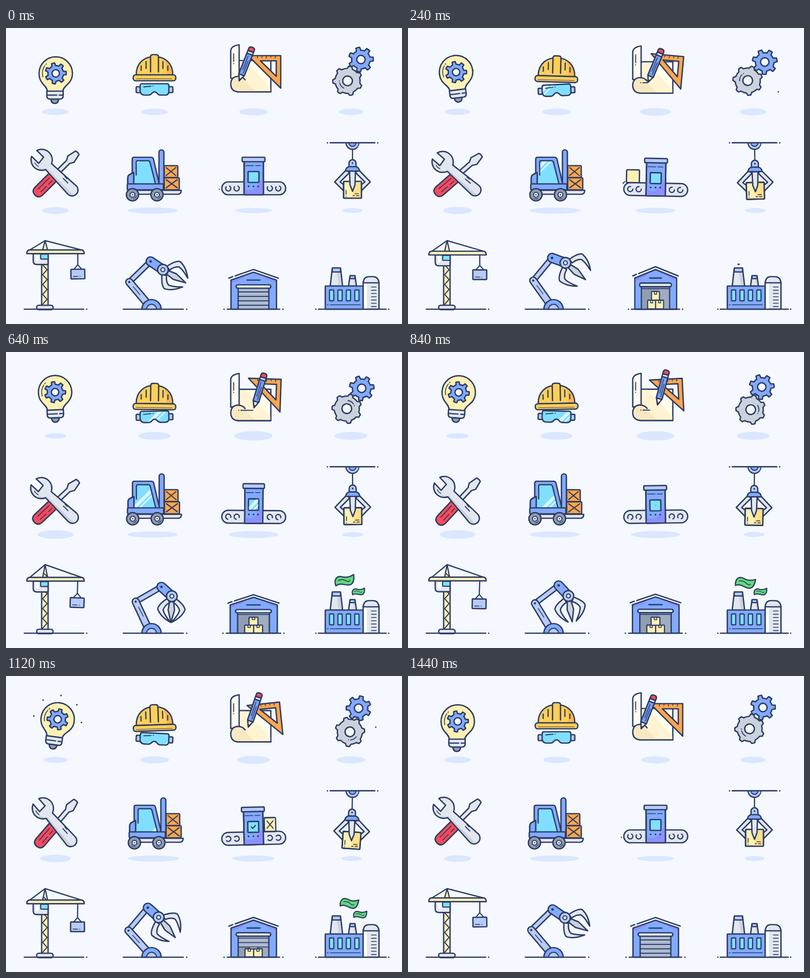
Write an HTML page with a canvas that moves like this. It is 800 by 600 pixels and loops after 1480 ms.

```html
<!DOCTYPE html>
<html lang="en">
<head>
<meta charset="utf-8">
<title>Industry icons</title>
<style>
  html, body { margin: 0; width: 100%; height: 100%; overflow: hidden; background: #f5f8ff; }
  canvas { display: block; width: 800px; height: 600px; }
</style>
</head>
<body>
<canvas id="stage"></canvas>
<script>
const LOOP = 1480, STEP = 40, CYCLE = 1440;
const INK = '#2b3b63', BG = '#f5f8ff', SHADOW = '#dbe6ff', BLUE = '#82aaff', PALE = '#b7cbf8',
  VIOLET = '#8c90ff', CYAN = '#80dfff', CREAM = '#fff0b3', GOLD = '#ffcf58', ORANGE = '#ffa64d',
  RED = '#fa4a5b', LIGHT = '#e2e7ef', GREY = '#cbd2dc', SLATE = '#909db3', GREEN = '#62d97c';
const cv = document.getElementById('stage'), g = cv.getContext('2d');
const dpr = window.devicePixelRatio || 1;
cv.width = 800 * dpr;
cv.height = 600 * dpr;

let t = 0, sin = 0, lift = 0;

// Drawing helpers
function shape(d, fill, w = 2.7) {
  const p = typeof d === 'string' ? new Path2D(d) : d;
  if (fill) { g.fillStyle = fill; g.fill(p, 'evenodd'); }
  if (w) { g.lineWidth = w; g.stroke(p); }
}
function line(d, w = 2) { shape(d, null, w); }
function rect(x, y, w, h, r, fill, lw) {
  const p = new Path2D();
  p.roundRect(x, y, w, h, r);
  shape(p, fill, lw);
}
function oval(x, y, rx, ry, fill, lw) {
  const p = new Path2D();
  p.ellipse(x, y, rx, ry, 0, 0, 2 * Math.PI);
  shape(p, fill, lw);
}
const disc = (x, y, r, fill, lw) => oval(x, y, r, r, fill, lw);
const dot = (x, y, r = 1.5) => disc(x, y, r, INK, 0);
const shadow = (x, rx, y, ry) => oval(x, y, rx, ry, SHADOW, 0);
function arc(x, y, r, a, b, w = 2) {
  const p = new Path2D();
  p.arc(x, y, r, a * Math.PI / 180, b * Math.PI / 180);
  shape(p, null, w);
}
function put(x, y, deg, fn, sx = 1, sy = sx) {
  g.save();
  g.translate(x, y);
  g.rotate(deg * Math.PI / 180);
  g.scale(sx, sy);
  fn();
  g.restore();
}
function turn(x, y, deg, fn, sx, sy) {
  put(x, y, deg, () => { g.translate(-x, -y); fn(); }, sx, sy);
}
function clip(d, fn) {
  g.save();
  g.clip(new Path2D(d));
  fn();
  g.restore();
}
function shine(d, x, y) {
  clip(d, () => {
    shape(`M${x - 35},${y + 30}l60,-60h9l-60,60z m14,0l60,-60h4l-60,60z`, 'rgba(255,255,255,.72)', 0);
  });
}
function ground(a, b, dots) {
  line(`M${a},570H${b}`, 2.6);
  dots.forEach(x => dot(x, 570));
}

// Timing helpers
const KEYS = [0, 240, 440, 640, 1000, 1240], N = KEYS.length;
function pose(...v) {
  const u = t % CYCLE;
  let i = N - 1;
  while (KEYS[i] > u) i--;
  const at = j => KEYS[(j + N) % N] + CYCLE * Math.floor(j / N);
  const val = j => v[(j + N) % N];
  const slope = j => (val(j + 1) - val(j - 1)) / (at(j + 1) - at(j - 1));
  const d = at(i + 1) - at(i), x = (u - at(i)) / d, y = 1 - x;
  return y * y * (1 + 2 * x) * val(i) + x * x * (3 - 2 * x) * val(i + 1)
    + d * x * y * (y * slope(i) - x * slope(i + 1));
}
function ramp(a, b) {
  const x = Math.min(1, Math.max(0, (t - a) / (b - a)));
  return x * x * (3 - 2 * x);
}
function lerpKeys(...k) {
  if (t <= k[0]) return k[1];
  for (let i = 2; i < k.length; i += 2)
    if (t <= k[i]) return k[i - 1] + (k[i + 1] - k[i - 1]) * (t - k[i - 2]) / (k[i] - k[i - 2]);
  return k[k.length - 1];
}

function gear(x, y, r, root, deg, fill, hole, base, tip) {
  put(x, y, deg, () => {
    const p = new Path2D(), s = 2 * Math.PI / 7;
    for (let i = 0; i < 7; i++) {
      p.arc(0, 0, r, (i - tip) * s, (i + tip) * s);
      p.arc(0, 0, root, (i + base) * s, (i + 1 - base) * s);
    }
    p.closePath();
    shape(p, fill);
    disc(0, 0, hole, BG);
  });
}

function bulb() {
  shadow(100, 27 - 5.3 * lift, 170, 6.5 - lift);
  turn(100.5, 120 - 11 * lift, -8 * sin, () => {
    g.translate(100.5, 92 - 11 * lift);
    const u = t % 720, grow = 34 + 20 * Math.sqrt(Math.min(1, Math.max(0, u - 240) / 300));
    const size = u > 460 ? Math.max(0, 1 - (u - 440) / 70) : 1;
    if (u >= 240) for (let a = 0; a < 5; a++)
      dot(-grow * Math.cos(a * Math.PI / 4), -grow * Math.sin(a * Math.PI / 4), 1.6 * size);
    shape('M-17,37C-17,24 -33.7,22 -33.7,0A33.7,33.7 0 0 1 33.7,0C33.7,22 15,24 14,37Z', CREAM);
    shape('M-10,52H6Q5,61 -2,61Q-9,61 -10,52Z', SLATE);
    shape('M-18,36H15V45Q15,52 9,52H-12Q-18,52 -18,45Z', LIGHT);
    line('M-18,44H2M7,44H15', 2.4);
    arc(0, 0, 27, 165, 215, 1.6);
    arc(0, 0, 27, 222, 226, 1.6);
    gear(0, 0, 21.3, 15.8, t / 4 - 2, BLUE, 7.5, .27, .17);
  });
}

function helmet() {
  shadow(300, 27 + 6 * lift, 170, 6.5 + 1.5 * lift);
  put(300, 92 + 10 * lift, 2 * sin, () => {
    const dome = 'M-37,3C-37,-22 -20,-34 0,-34C20,-34 37,-22 37,3Z';
    shape(dome, GOLD, 0);
    clip(dome, () => shape('M14,-40H40V4H24Q26,-20 14,-40Z', '#ffb64f', 0));
    shape(dome);
    shape('M-8,-3V-34Q-8,-38 -3,-38H3Q8,-38 8,-34V-3', GOLD);
    line('M-17,-24V-10M-27,-15V-6M17,-24V-10M27,-15V-6', 2.4);
    rect(-43, 3, 86, 12, 5, GOLD);
    line('M-37,11H36', 1);
  });
  put(300, 124 + 7 * lift, -3 * sin, () => {
    rect(-37, -5, 10, 12, 2, PALE);
    rect(27, -5, 10, 12, 2, PALE);
    const lens = 'M-29,-7Q-29,-11 -25,-11H25Q29,-11 29,-7V4Q29,12 22,12H12Q8,12 5,8Q0,3 -5,8Q-8,12 -12,12H-20Q-28,12 -29,4Z';
    shape(lens, CYAN, 0);
    shine(lens, (t - 620) * .075, 0);
    shape(lens);
    line('M-22,-4.5L-7,-6M-3,-6.3h.5', 1.8);
  });
}

function blueprint() {
  shadow(500, 29 + 10 * lift, 170, 7 + 2.5 * lift);
  put(0, 10 * lift, 0, () => {
    shape('M468,66H535V129.5H468Z', '#fffdea');
    shape('M473,67.5H484L534,122V128.5H473Z', '#fff3d2', 0);
    shape('M471,34V102H454V46Q455,36 471,34Z', '#fffdf0');
    line('M460,52V68M460,72v.5', 1.8);
    shape('M454,113Q455,99 468,98Q481,99 484,110L505,129.5H470Q454,129 454,113Z', '#f8e8c2', 0);
    line('M535,129.5H470Q454,129 454,113Q455,99 468,98Q478,98 483,105', 2.7);
    const end = lerpKeys(60, 470, 240, 484, 440, 497, 680, 499, 1000, 478, 1100, 468);
    if (end > 470) line(`M470,108.5h.4M474.5,108.5H${Math.max(474.6, end)}`, 2);
  });
  turn(530, 78, 6 * sin, () => {
    g.translate(0, -1.5 * lift);
    shape('M489,56H555V122ZM514,66.5H546V98Z', ORANGE);
    line('M508,57v4M517,57v3M526,57v4M535,57v3M544,57v4', 1.6);
  });
  const x = pose(471, 485, 498, 501, 502, 475), y = pose(107, 110, 110.5, 113, 103, 105.5);
  put(x, y, pose(21.5, 22.4, 21, 17, 15, 23), () => {
    shape('M0,0L-6,-14H6Z', '#fff0d0');
    shape('M0,0L-2.4,-5.5H2.4Z', INK, 0);
    rect(-6, -59, 12, 46, 1, '#7a9ff5');
    line('M-1.5,-53V-24M2,-44V-18', 1.5);
    rect(-6, -64, 12, 6, 1, LIGHT);
    shape('M-6,-64V-68Q-6,-73 0,-73Q6,-73 6,-68V-64Z', RED);
  });
}

function gears() {
  shadow(697, 25 + 8.5 * lift, 170, 6.5 + 1.8 * lift);
  if (t >= 160 && t < 600) dot(lerpKeys(160, 752, 240, 748, 440, 724, 600, 700), lerpKeys(160, 130, 600, 126));
  if (t >= 880 && t < 1220) dot(lerpKeys(880, 703, 1000, 723, 1200, 763), lerpKeys(880, 93, 1000, 97, 1200, 108));
  const a = (-58 + 12 * sin) * Math.PI / 180, dx = 25.5 * Math.cos(a), dy = 25.5 * Math.sin(a);
  const y = 85.5 + 9 * lift, spin = t / 4;
  gear(703.5 + dx, y + dy, 25, 18.8, -spin - 2, BLUE, 8.5, .27, .17);
  gear(703.5 - dx, y - dy, 29.8, 25.4, spin + 178, GREY, 9.8, .24, .12);
  arc(703.5 - dx, y - dy, 16.5, spin + 118, spin + 165, 1.8);
  arc(703.5 - dx, y - dy, 16.5, spin + 178, spin + 180, 1.8);
}

function tools() {
  shadow(100, 27 + 9.5 * lift, 370, 6.8 + 2 * lift);
  const y = 297 + 8 * lift;
  put(103, y - 3, -45 + 4.5 * sin, () => {
    shape('M-10,-4.5H32L40,-9L58,-5Q60,0 58,5L40,9L32,4.5H-10Z', LIGHT);
    shape('M-12,-11H-53Q-63,-10 -63,0Q-63,10 -53,11H-12Q-8,0 -12,-11Z', RED);
    line('M-50,-4H-18M-50,4H-34M-28,4H-18', 1.8);
  });
  put(103, y + 1, 45 - 4.5 * sin, () => {
    g.translate(-44, 0);
    const body = 'M-20,-6.4H-.5L1,9.5H-19A21.5,21.5 0 0 0 20,8.5L87,12A12,12 0 0 0 87,-12L20,-8.5A21.5,21.5 0 0 0 -20,-6.4Z';
    shape(body, LIGHT, 0);
    clip(body, () => shape('M-14,14Q10,20 20,5H100V16H-14Z', GREY, 0));
    shape(body);
    line('M58,-4L71,-4M58,-9L64,-9', 2);
    arc(0, 0, 15, 70, 110, 1.6);
  });
}

function crate(x, y, w, h, deg) {
  put(x + w / 2, y + h / 2, deg, () => {
    const a = w / 2 - 4, b = h / 2 - 4;
    rect(-w / 2, -h / 2, w, h, 2, ORANGE);
    line(`M${-a},${-b}L${a},${b}M${a},${-b}L${-a},${b}`, 2.2);
  });
}

function forklift() {
  const s = 2 - 2 * Math.cos(t / CYCLE * 4 * Math.PI);
  shadow(296 + s / 2, 50.5 + s * .4, 370, 6.3);
  put(s, 0, 0, () => {
    const hop = pose(0, 0, 1, 0, 0, 0);
    crate(319.5 + hop, 303.5 - 1.5 * hop, 30.5, 24.5, -3 * hop);
    crate(319.5 + hop, 279 - 2.5 * hop, 27.5, 24, -3.5 * hop);
    shape('M246,328V304Q246,299 250,297L257,293V328Z', BLUE);
    shape('M255,318V266Q255,262 259,262H293Q297,262 298,266L310,318Z', BLUE);
    const pane = 'M263,270H288L301,316H259Z';
    shape(pane, CYAN, 0);
    shine(pane, 280 + (t - 620) * .075, 293);
    line('M263,298V272Q263,269 266,269H287Q290,269 291,272L302,316', 2.4);
    shape('M246,316V304Q246,299 250,297L258,293V316Z', BLUE, 0);
    line('M246,316V304Q246,299 250,297L258,293V316', 2.7);
    rect(309, 247, 10, 82, 5, BLUE);
    rect(245, 316, 73, 12, 2, BLUE);
    shape('M262,329H354Q354,337 347,337H262Z', LIGHT);
    for (const x of [255.5, 305]) {
      disc(x, 338, 12.3, SLATE);
      disc(x, 338, 5, LIGHT, 2.2);
      put(x, 338, s * 15, () => { dot(0, 0, 1.3); arc(0, 0, 8.4, 20, 75, 1.3); });
    }
  });
}

function parcel(x, y, cross) {
  const size = Math.min(ramp(40, 200), 1 - ramp(1200, 1400));
  if (size <= .02) return;
  put(x, y, 0, () => {
    rect(-13, -26, 26, 26, 2, CREAM);
    if (cross) line('M-7,-20L7,-6M7,-20L-7,-6', 2);
  }, size * (cross ? .88 : 1), size * (cross ? 1.08 : 1));
}

function conveyor() {
  shadow(500, 37.5 + 13 * lift, 370, 5.3 + 2 * lift);
  turn(500, 325 + 9.5 * lift, 1.3 * sin, () => {
    g.translate(0, 9.5 * lift);
    rect(436, 312, 129, 26, 13, LIGHT);
    for (const x of [449, 466, 533, 550]) arc(x, 325, 5.2, t / 4 - 60, t / 4 + 215, 2.5);
    if (t % CYCLE < 80) dot(431, 327, 1.2);
    if (t > 160 && t < 320) arc(440, 316, 6, 200, 250, 2);
    parcel(lerpKeys(40, 436, 240, 454, 440, 485, 540, 500, 895, 500, 1000, 516, 1240, 552, 1400, 566), 312, t > 720);
    const pull = ramp(480, 640) - ramp(640, 840);
    turn(500, 338, 0, () => {
      rect(481, 268, 39, 70, 1, BLUE);
      shape('M482,326Q500,334 508,318L519,306V337H482Z', VIOLET, 0);
      rect(481, 268, 39, 70, 1);
      rect(477, 262, 46, 9, 2, PALE);
      line('M484,279H500M504,279h10', 1.5);
      rect(489, 291, 22, 22, 1, CYAN);
      if (t > 480 && t < 780) shine('M490,292H510V312H490Z', 500 + (t - 640) * .07, 302);
      const tick = ramp(800, 920) * (1 - ramp(1290, 1390));
      if (tick > 0) put(500, 302, 0, () => line('M-4,0L-1,3L4.5,-3', 2.2), tick);
      for (const x of [490, 500, 509.5]) dot(x, 321, 1.8);
    }, 1 - .06 * pull, 1 + .055 * pull);
  });
}

function claw() {
  const drop = pose(0, 2, 3.2, 4.8, 6.5, 3);
  shadow(700 + 2 * sin, 20 + 1.5 * lift, 370, 5);
  turn(700, 233, -1.2 * sin, () => {
    line('M700,246V270', 2.4);
    g.translate(0, drop * .55);
    const arm = () => shape('M-13,288L-36,312L-18,330L-15,320L-25,312L-6,293Z', LIGHT);
    put(700, 0, 0, arm);
    put(700, 0, 0, arm, -1, 1);
    put(700, 328 + drop * .45, pose(0, -.5, -.5, 0, 1, 4.2), () => {
      rect(-18, -17, 36, 34, 1, CREAM);
      shape('M4,-16H17V16H0Z', '#ffe089', 0);
      rect(-18, -17, 36, 34, 1);
      line('M-13,1V9M-13,13v.4M5,8H12M1,12H4M8,12H13', 1.7);
    });
    shape('M694,290L695,318L700,331L705,318L706,290Z', LIGHT);
    shape('M693,282V274A7,7 0 0 1 707,274V282Z', PALE);
    dot(700, 274, 1.8);
    shape('M686,290Q686,283 693,281H707Q714,283 714,290Z', BLUE);
  });
  shape('M687,233A13,13 0 0 0 713,233Z', PALE, 0);
  arc(700, 233, 13, 8, 30);
  arc(700, 233, 13, 40, 176, 2.4);
  shape('M693,233A7,7 0 0 0 707,233Z', BLUE, 2);
  line('M655,232.7H745', 2.8);
  dot(649.5, 232.7);
  dot(751, 232.7);
}

function crane() {
  const j = pose(0, 2.7, 5.8, 7, 5.8, 2.5), y = 457.3 + j;
  rect(72, y, 13, 563 - y, 0, CREAM);
  clip(`M72,${y}H85V562H72Z`, () => {
    let d = 'M74,560';
    for (let i = 1; i < 11; i++) d += `L${i % 2 ? 83 : 74},${560 - i * 10}`;
    line(d, 2);
  });
  rect(62, 562, 33, 9, 4, LIGHT);
  line(`M79,431L48,${450 + j}M79,431L153,${450 + j}`, 2.4);
  shape(`M79,431L74,${450 + j}H84Z`, CREAM, 2.4);
  if (lift > .3) line('M76,448L83,455', 1.8);
  shape(`M55,${y}H85V${y + 22}H62Q55,${y + 22} 55,${y + 15}Z`, LIGHT);
  shape(`M60,${y + 3}h6v12h-6z`, '#fff', 0);
  rect(70, y + 1, 15, 10, 1, CYAN, 2.2);
  shape(`M42,${y}Q42,${y - 7.5} 48,${y - 7.5}H152Q158,${y - 7.5} 158,${y}Z`, CREAM);
  const b = pose(0, 1.3, 6, 9.3, 12, 6), x = pose(145, 145, 144, 144, 144, 145);
  line(`M145,${y}L${x},${480 + b}`, 2.4);
  put(x, 489 + b, pose(-1, 0, 0, 2, 0, 0), () => {
    line('M-8,0L0,-9L8,0', 2.2);
    rect(-14, 0, 28, 19.5, 1, PALE);
    line('M-9,14.5H0M4,14.5h.4', 1.6);
  });
  ground(37, 157, [163]);
}

function limb(x1, y1, x2, y2, w, fill) {
  const d = `M${x1},${y1}L${x2},${y2}`;
  line(d, w + 2.7);
  g.strokeStyle = fill;
  line(d, w - 2.7);
  g.strokeStyle = INK;
}

function robot() {
  const ex = pose(249, 253, 258, 262, 251, 245), ey = pose(515, 512, 508, 506, 513, 518);
  const sx = pose(292, 291, 304, 314, 294, 282), sy = pose(473, 466, 470, 476, 470, 470);
  const wx = pose(317, 318, 330, 335, 314, 306), wy = pose(490, 476, 484, 495, 492, 487);
  const aim = pose(30, 40, 74, 92, 67, 35), open = pose(10, 22, 12, 0, 15, 13);
  limb(ex, ey, sx, sy, 10, PALE);
  limb(287, 560, ex, ey, 14, PALE);
  const px = 294 - ex, py = 568 - ey;
  line(`M${ex + px * .18},${ey + py * .18}l${px * .3},${py * .3}`, 1.5);
  dot(ex, ey, 2.2);
  limb(sx, sy, wx, wy, 18, BLUE);
  dot(sx, sy, 2.6);
  put(wx, wy, aim, () => {
    const finger = () => shape('M5,-9Q18,-27 27,-27.5Q43,-21 53,-1Q38,-14 29,-16.5Q20,-15 13,-4Z', LIGHT);
    shape('M11,-4L28,-6.5L53,0L28,6.5L11,4Z', GREY);
    put(0, 0, -open, finger);
    put(0, 0, open, finger, 1, -1);
  });
  disc(wx, wy, 10.8, PALE);
  disc(wx, wy, 4, LIGHT, 2.2);
  shape('M274.5,570A19.5,19.5 0 0 1 313.5,570Z', BLUE);
  shape('M284,570A10,10 0 0 1 304,570Z', PALE, 2);
  ground(237, 358, [365]);
}

function carton(x, y, deg) {
  put(x, y, deg, () => {
    rect(-8.7, -16.5, 17.4, 16.5, 1, CREAM, 2.3);
    line('M-2.5,-16V-11.5H2.5V-16', 1.7);
  });
}

function garage() {
  const w = pose(1, .92, .935, 1.035, 1, 1);
  turn(500, 570, 0, () => {
    const body = 'M454.5,570V511L500,495L546.5,511V570Z';
    shape(body, BLUE, 0);
    shape('M456,512L484,502L478,508L456,517ZM545,512L522,504L529,510L545,517Z', VIOLET, 0);
    shape(body);
    line('M463,502.5L500,489.5L550,507M450,507L458,504', 2.7);
    line('M487,511H513', 2.6);
    rect(469, 525, 62, 45, 0, SLATE, 0);
    const hop = pose(0, 0, 1, 0, 0, 0);
    clip('M469,525H531V570H469Z', () => {
      shape('M510,525H531V570H494Z', '#9facc2', 0);
      carton(491.5, 569.5 - 2.5 * hop, -4 * hop);
      carton(509, 569.5 - 4 * hop, 4 * hop);
      carton(500, 553 - 8 * hop, 2 * hop);
      const edge = 571 - 40 * (ramp(40, 220) - ramp(1030, 1220));
      rect(468, 520, 64, edge - 520, 0, '#aebad0', 0);
      for (let y = edge; y > 524; y -= 9) line(`M469,${y}H531`, 1.9);
    });
    line('M469,526V570M531,526V570', 2.6);
    rect(465, 520.5, 70, 7, 3.5, LIGHT);
  }, w, 1 + (1 - w) * .88);
  ground(500 - 53 * w, 500 + 53 * w, [500 - 59.5 * w, 500 + 59.5 * w]);
}

function puff(x, y, deg, s) {
  if (s <= .02) return;
  const d = 'M-19,8C-22,-6 -14,-12 -5,-9C4,-5 12,-6 20,-10C20,2 16,9 9,10C-1,10 -8,2 -19,8Z';
  put(x, y, deg, () => {
    shape(d, GREEN, 2.5 / s ** .8);
    line('M-13,-2Q-5,-5 2,0T11,1', 1.7);
  }, s);
}

function factory() {
  const fade = 1 - ramp(1270, 1400);
  puff(pose(668, 668, 686, 684, 682, 701), pose(482, 479, 470, 463.5, 470, 454.5),
    pose(0, 0, 0, -8, 18, -6), lerpKeys(200, 0, 240, .09, 440, 1, 1000, .98, 1240, .84) * fade);
  puff(pose(702, 702, 706, 712, 712, 717), pose(496, 494, 487, 486, 486, 483),
    pose(0, 0, -10, -4, -2, 0), lerpKeys(280, 0, 440, .42, 640, .64, 1240, .68) * fade);
  const stack = (x, y, top, foot, band) => {
    shape(`M${x - top},${y}H${x + top}L${x + foot},523H${x - foot}Z`, LIGHT);
    shape(`M${x + 1},${y + band}H${x + top - 1}L${x + foot - 2},522H${x + 5}Z`, GREY, 0);
    rect(x - top, y, top * 2, band, 1, PALE, 2.4);
  };
  stack(667.5, 486.5, 8.3, 12.5, 8);
  stack(700, 502, 5, 8, 6);
  rect(645, 523, 77, 47, 1, BLUE);
  for (let i = 0; i < 4; i++) rect(653.5 + 17 * i, 531, 8.6, 22, 1, CYAN, 2.3);
  line('M649,561H651M655,561H716', 1.5);
  shape('M721.5,570V516Q723,504 733,504H741Q752,504 753.5,516V570Z', LIGHT);
  shape('M723,518H729V569H723Z', '#fff', 0);
  line('M721.5,516.5H753.5', 2.4);
  for (let y = 525; y < 566; y += 6.6) line(`M738,${y}H748`, 1.6);
  ground(631, 768, [626, 773]);
}

const icons = [bulb, helmet, blueprint, gears, tools, forklift, conveyor, claw, crane, robot, garage, factory];

function frame() {
  t = Math.floor(performance.now() % LOOP / STEP) * STEP;
  const a = t / CYCLE * 2 * Math.PI;
  sin = Math.sin(a);
  lift = (1 - Math.cos(a)) / 2;
  g.setTransform(dpr, 0, 0, dpr, 0, 0);
  g.fillStyle = BG;
  g.fillRect(0, 0, 800, 600);
  g.strokeStyle = INK;
  g.lineJoin = g.lineCap = 'round';
  for (const draw of icons) { g.save(); draw(); g.restore(); }
  requestAnimationFrame(frame);
}
frame();
</script>
</body>
</html>
```
